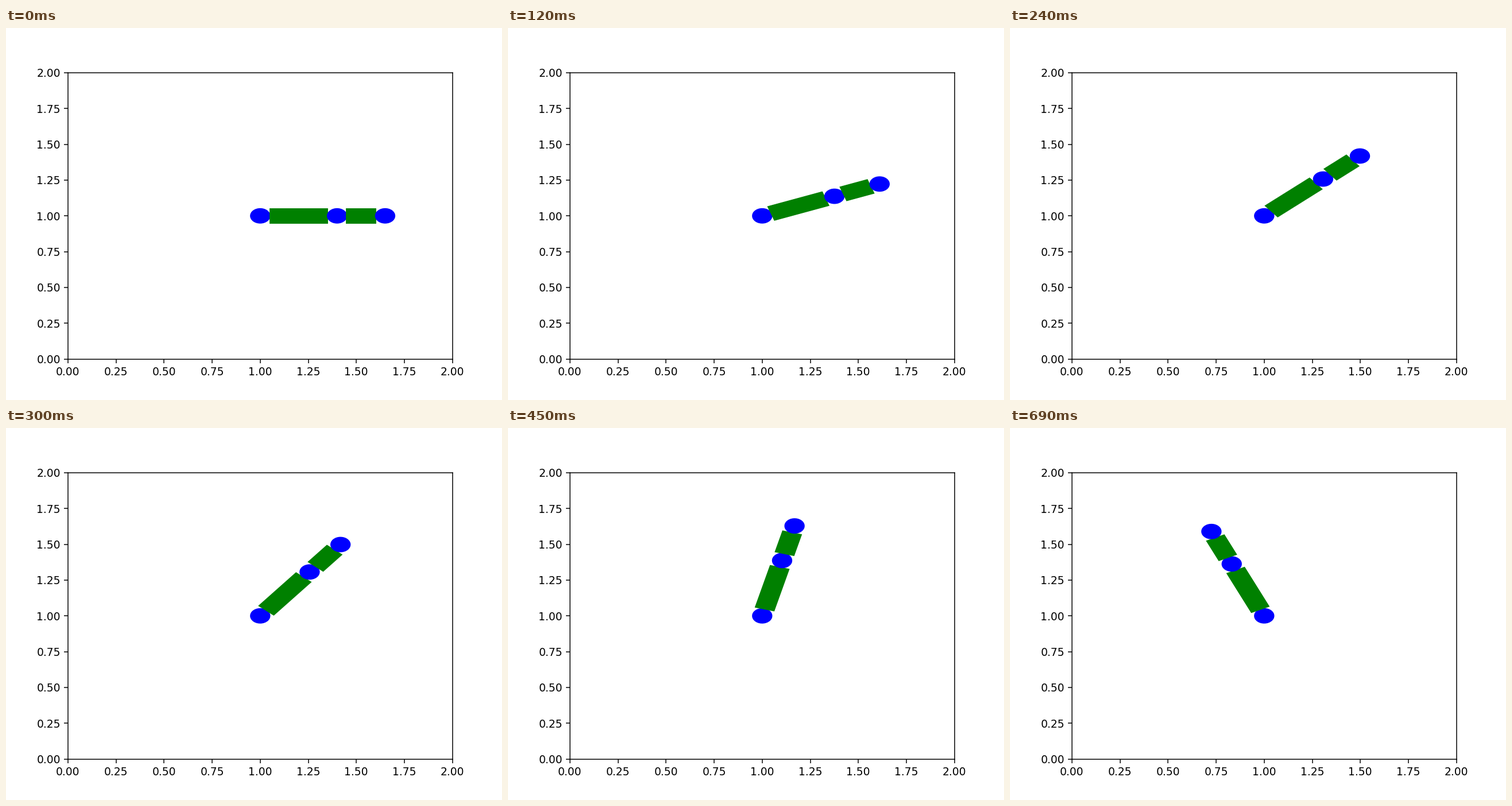
These frames come from a looping animation (864x648 px, 0.72 s). A matplotlib script:

```python
import matplotlib.pyplot as plt
from matplotlib.animation import FuncAnimation
from matplotlib.patches import Circle, Rectangle
from matplotlib.transforms import Affine2D

FRAMES = 24
INTERVAL = 30        # ms
STEP = 5             # degrees per frame
RADIUS = 0.05
PIVOT = (1.0, 1.0)
JOINTS = (1.0, 1.4, 1.65)

fig, ax = plt.subplots(figsize=(6.4, 4.8), dpi=135)
ax.set_xlim(0, 2)
ax.set_ylim(0, 2)


def build_arm():
    """Alternate joints and links outward, each drawn over the one before."""
    parts = []
    for i, x in enumerate(JOINTS):
        parts.append(Circle((x, PIVOT[1]), RADIUS, color="b"))
        if i + 1 < len(JOINTS):
            length = JOINTS[i + 1] - x - 2 * RADIUS
            corner = (x + RADIUS, PIVOT[1] - RADIUS)
            parts.append(Rectangle(corner, length, 2 * RADIUS, color="g"))
    for part in parts:
        ax.add_patch(part)
    return parts


arm = build_arm()


def update(frame):
    # Rotating in data space shears the links on the unequal axes.
    turn = Affine2D().rotate_deg_around(*PIVOT, STEP * frame)
    for part in arm:
        part.set_transform(turn + ax.transData)
    return arm


anim = FuncAnimation(fig, update, frames=FRAMES, interval=INTERVAL,
                     init_func=lambda: update(0), repeat=True,
                     repeat_delay=0, blit=False)
plt.show()
```
